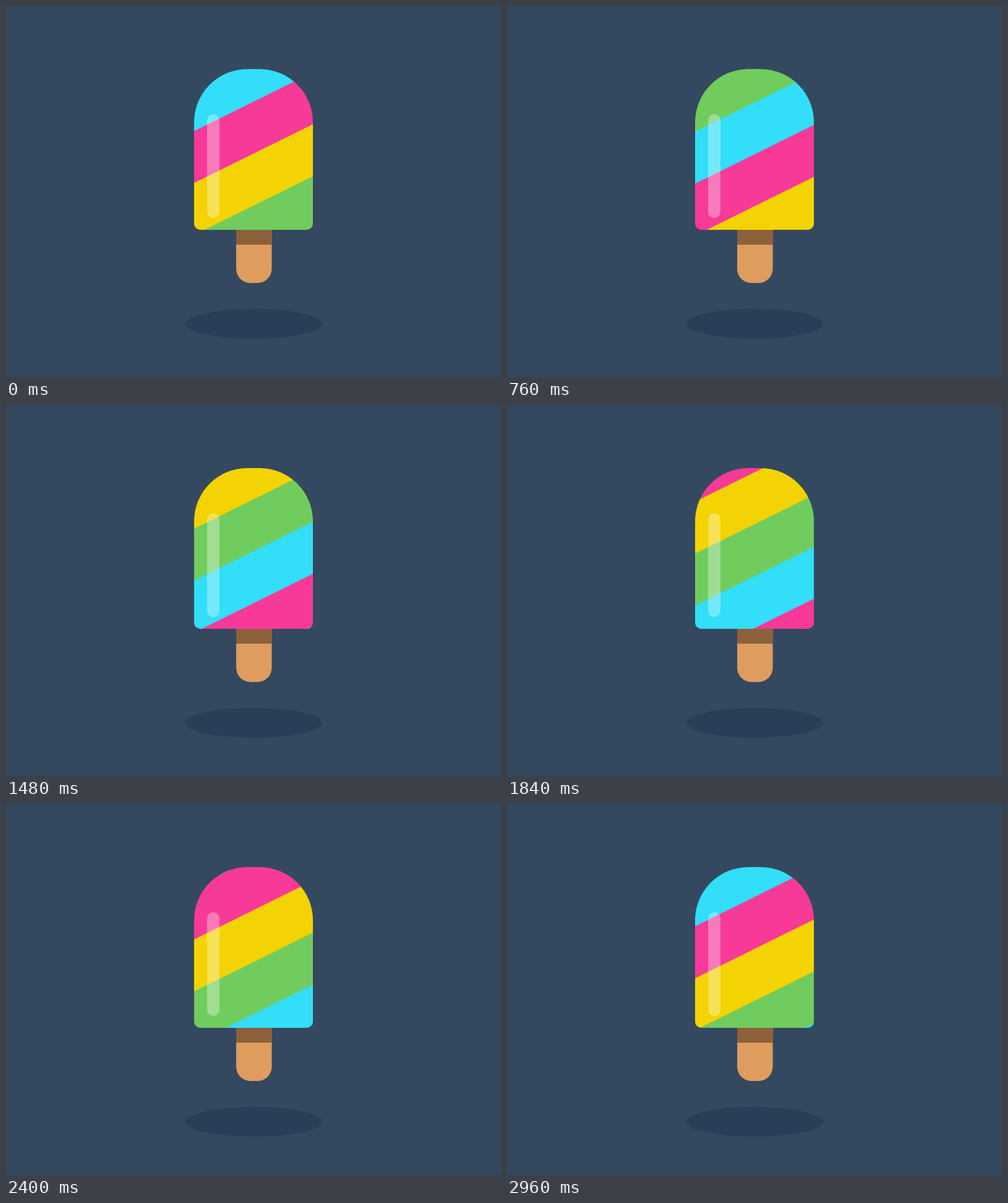
These frames come from a looping animation (800x600 px, 3 s). An HTML page:

```html
<!DOCTYPE html>
<html lang="en">
<head>
<meta charset="utf-8">
<title>Ice lolly</title>
<style>
  html, body { margin: 0; width: 100%; height: 100%; overflow: hidden; background: #34495f; }
  svg { display: block; width: 800px; height: 600px; }
</style>
</head>
<body>
<svg viewBox="0 0 800 600">
  <defs>
    <clipPath id="body">
      <path d="M304 188A86 86 0 0 1 390 102H410A86 86 0 0 1 496 188V352A10 10 0 0 1 486 362H314A10 10 0 0 1 304 352Z"/>
    </clipPath>
  </defs>
  <ellipse cx="400.5" cy="514" rx="110.5" ry="24" fill="#283f57"/>
  <path d="M372 362H429.5V425A23 23 0 0 1 406.5 448H395A23 23 0 0 1 372 425Z" fill="#df9c5f"/>
  <rect x="372" y="362" width="58" height="24" fill="#8d613b"/>
  <g clip-path="url(#body)"><g id="stripes"></g></g>
  <rect x="325" y="175" width="20" height="168" rx="10" fill="#fff" fill-opacity=".33"/>
</svg>
<script>
const colors = ['#32def8', '#f73a98', '#f3d303', '#71cc5e'];
const band = 84, left = 304, right = 496, rise = 95;
const firstTop = 118.2;
const loop = 3000, steps = 75;
const stripes = document.getElementById('stripes');

// Each band reaches far down and the next one covers it, so no seams show.
for (let i = -5; i <= 5; i++) {
  const y = firstTop + i * band;
  const p = document.createElementNS('http://www.w3.org/2000/svg', 'path');
  p.setAttribute('d', `M${left} ${y}L${right} ${y - rise}V900H${left}Z`);
  p.setAttribute('fill', colors[(i + 8) % 4]);
  stripes.append(p);
}

stripes.animate(
  { transform: ['translateY(0px)', `translateY(${band * colors.length}px)`] },
  { duration: loop, iterations: Infinity, easing: `steps(${steps}, end)` }
);
</script>
</body>
</html>
```
